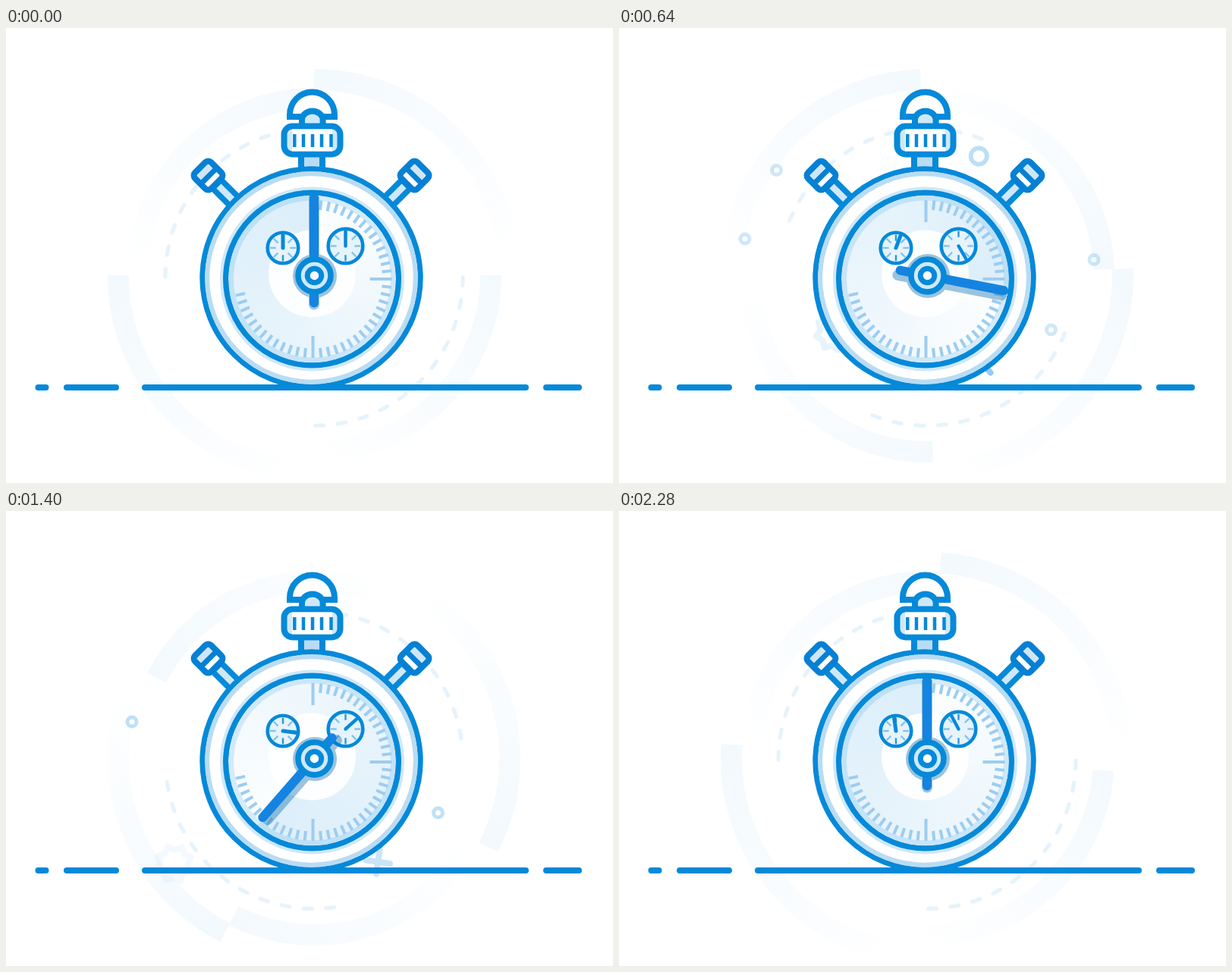
Animation, 800 px wide and 600 px high, one loop 2320 ms. Source, as an HTML page:

```html
<!DOCTYPE html>
<html lang="en">
<head>
<meta charset="utf-8">
<title>Stopwatch</title>
<style>
  html, body { margin: 0; width: 100%; height: 100%; overflow: hidden; background: #fff; }
  svg { display: block; width: 800px; height: 600px; }
  #sweep { width: 224px; height: 224px; border-radius: 50%; }
</style>
</head>
<body>
<svg viewBox="0 0 800 600" fill="none" stroke="#0589d9">
  <defs>
    <linearGradient id="fade" gradientUnits="userSpaceOnUse" x1="0" y1="-250" x2="250" y2="0">
      <stop offset="0" stop-color="#0589d9" stop-opacity=".05"/>
      <stop offset="1" stop-color="#0589d9" stop-opacity="0"/>
    </linearGradient>
    <clipPath id="face"><circle cx="403.5" cy="331" r="113"/></clipPath>
    <g id="button" stroke="#0680d4">
      <g transform="translate(266.5 194.5) rotate(-45)">
        <rect x="-8" y="16" width="16" height="42" fill="#cfe8f8" stroke="#0589d9" stroke-width="7.5"/>
        <rect x="-15" y="-15" width="30" height="30" rx="5.5" fill="#fff" stroke="none"/>
        <rect x="-15" y="-15" width="30" height="15" rx="5" fill="#cfe6f7" stroke="none"/>
        <path d="M-15 1H15" stroke-width="7"/>
        <rect x="-15" y="-15" width="30" height="30" rx="5.5" stroke-width="8"/>
      </g>
    </g>
  </defs>

  <g id="arcs" stroke="url(#fade)" stroke-width="28"></g>
  <g id="dashes" stroke-width="5" stroke-linecap="round" stroke-dasharray="11 18.5" opacity=".105"></g>
  <g id="bubbles" stroke-width="5"></g>
  <circle id="ring"/>
  <path id="gear" stroke-width="8" stroke-linejoin="round"/>
  <path id="plus" d="M-16 0H16M0 -16V16" stroke="#2f9be0" stroke-width="8" stroke-linecap="round"/>

  <use href="#button"/>
  <use href="#button" transform="translate(805 0) scale(-1 1)"/>

  <path d="M389 164V190H417V164" fill="#b9dcf4" stroke-width="8"/>
  <g id="crown" stroke-width="8">
    <path d="M374 117V114.5A29.5 30 0 0 1 433 114.5V117Z" fill="#fff"/>
    <path d="M390 128V121.5A13.8 12 0 0 1 417.6 121.5V128" fill="#cfe8f8"/>
    <rect x="366.5" y="129.5" width="74" height="37" rx="11" fill="#cfe8f8"/>
    <rect x="377" y="133.5" width="53" height="29" fill="#fff" stroke="none"/>
    <path d="M380.3 140V157M392 140V157M404 140V157M416 140V157M428.5 140V157" stroke-width="4.5"/>
  </g>

  <circle cx="402.5" cy="329.5" r="143.7" fill="#fff" stroke-width="7"/>
  <circle cx="402.5" cy="329.5" r="137.3" stroke="#b9dcf3" stroke-width="6"/>
  <circle cx="403.5" cy="331" r="119" stroke="#cfe8f8" stroke-width="5"/>
  <foreignObject x="291.5" y="219" width="224" height="224"><div id="sweep"></div></foreignObject>
  <circle cx="403.5" cy="331" r="107.5" stroke-width="8" opacity=".15"/>
  <circle cx="403.5" cy="324" r="57.5" fill="#fff" stroke="none" opacity=".92"/>
  <g id="ticks" transform="translate(404.5 331)" stroke="#9dcdf0" stroke-width="4"></g>
  <g id="dials"></g>
  <g clip-path="url(#face)">
    <g stroke="#0a6bab" opacity=".4" stroke-linecap="round">
      <path id="shade" d="M0 38V-101" stroke-width="14"/>
      <circle cx="407" cy="327" r="29" fill="#0a6bab" stroke="none"/>
    </g>
    <circle cx="403.5" cy="331" r="114" stroke-width="7"/>
    <path id="hand" d="M0 36V-103" stroke="#1484e0" stroke-width="12" stroke-linecap="round"/>
  </g>
  <circle cx="403.5" cy="331" r="114" stroke-width="7"/>
  <circle cx="406.5" cy="326.5" r="21.5" fill="#cfe9f9" stroke-width="7.5"/>
  <circle cx="406.5" cy="326.5" r="9.2" fill="#fff" stroke-width="7"/>

  <path d="M42.5 474H52.5M80 474H145M183 474H685M712 474H755" stroke-width="8" stroke-linecap="round"/>
</svg>
<script>
const LOOP = 2320, STEP = 40, TURN = 2280;
const $ = id => document.getElementById(id);

function add(parent, tag, attrs) {
  const el = document.createElementNS('http://www.w3.org/2000/svg', tag);
  for (const k in attrs) el.setAttribute(k, attrs[k]);
  parent.appendChild(el);
  return el;
}

// Fading quarter bands: radius, start angle, direction
for (const [r, a, dir] of [[258, 0, 1], [258, 270, -1], [233, 90, 1], [233, 0, -1]])
  add($('arcs'), 'path', { d: `M0 ${-r}A${r} ${r} 0 0 1 ${r} 0`, transform: `rotate(${a}) scale(${dir} 1)` });

for (const a of [0, 180])
  add($('dashes'), 'path', { d: 'M1.5 196A196 196 0 0 0 196 0', transform: `rotate(${a})` });

const bubbles = [[207.5, 187.5, 1000], [166, 278, 1560], [626, 305.5, 700], [569.5, 398, 2040]]
  .map(([cx, cy, end]) => ({ end, el: add($('bubbles'), 'circle', { cx, cy, r: 6 }) }));

let star = '';
for (let i = 0; i < 16; i++) {
  const r = i % 2 ? 18 : 24, a = i * Math.PI / 8;
  star += `${i ? 'L' : 'M'}${r * Math.sin(a)} ${-r * Math.cos(a)}`;
}
$('gear').setAttribute('d', star + 'Z');

for (let i = 0; i <= 43; i++)
  add($('ticks'), 'path', { d: `M0 -104V${i % 15 ? -91.5 : -75}`, transform: `rotate(${i * 6})` });

function makeDial(x, y, r, thick) {
  const g = add($('dials'), 'g', { transform: `translate(${x} ${y})` });
  add(g, 'circle', { r, fill: '#e6f3fb', 'stroke-width': 4.6 });
  for (let i = 0; i < 8; i++)
    add(g, 'path', {
      d: `M0 ${3 - r}V${11 - r}`, transform: `rotate(${i * 45})`,
      'stroke-width': 2.4, opacity: i % 4 ? .45 : .85
    });
  return add(g, 'path', { d: `M0 0V${3.5 - r}`, 'stroke-width': thick, 'stroke-linecap': 'round' });
}
const leftHand = makeDial(365, 290, 20.3, 5);
const rightHand = makeDial(447.5, 287.5, 22.8, 4.4);

const times = [0, 400, 840, 1120, 1400, 1760, 2280];
const leftKeys = [0, 3, 35, 76, 98, 205, 352];
const rightKeys = [0, 82, 206, 328, 408, 532, 692];

function lerpKeys(keys, t) {
  let i = 0;
  while (i < times.length - 2 && t > times[i + 1]) i++;
  return keys[i] + (keys[i + 1] - keys[i]) * (t - times[i]) / (times[i + 1] - times[i]);
}

const place = (el, x, y, a = 0) => el.setAttribute('transform', `translate(${x} ${y}) rotate(${a})`);
const fadeTo = (el, o) => el.setAttribute('opacity', Math.max(0, o));

function shadeOffset(a) {
  const bump = (from, to) => Math.sin(Math.PI * (a - from) / (to - from));
  if (a < 135) return 9.5 * bump(0, 135);
  return a > 180 ? -10 * bump(180, 360) : 0;
}

function draw(t) {
  const turn = 360 * t / TURN;
  place($('arcs'), 406, 326, .1291 * t + 1.34e-5 * t * t);
  place($('dashes'), 406, 328.5, turn * 2);

  place($('hand'), 406, 326.5, turn);
  const off = shadeOffset(turn);
  $('shade').setAttribute('transform', `translate(406 326.5) rotate(${turn}) translate(${off} 0)`);
  $('sweep').style.background =
    `conic-gradient(from ${turn}deg, rgba(5,137,217,.01), rgba(5,137,217,.085) 50%, rgba(5,137,217,.14))`;

  leftHand.setAttribute('transform', `rotate(${lerpKeys(leftKeys, t)})`);
  rightHand.setAttribute('transform', `rotate(${lerpKeys(rightKeys, t)})`);

  place($('crown'), 0, t < 360 ? 4 * Math.sin(Math.PI * t / 360) : 0);

  for (const b of bubbles) fadeTo(b.el, t < b.end ? Math.min(.25, t * .0003) : 0);

  place($('plus'), 470 + .0145 * t, 425 + .027 * t, 85 - .055 * t);
  fadeTo($('plus'), .72 - .00033 * t);

  const g = t - 840;
  place($('gear'), 267 - .081 * g, 418 + .084 * g, .05 * t);
  fadeTo($('gear'), Math.min(.09, (1640 - t) * .00019));

  const s = (t - 480) / 900, e = 1 - (1 - s) ** 2, ring = $('ring');
  const size = Math.max(0, Math.min(1, s * 4)) * (1.12 - .3 * s);
  place(ring, 438 + 112 * e, 195 - 80 * e);
  ring.setAttribute('r', 14 * size);
  ring.setAttribute('stroke-width', 7.5 * size);
  fadeTo(ring, s > 0 && s < 1 ? .33 * (1 - s) : 0);
}

function tick() {
  draw(Math.floor(performance.now() % LOOP / STEP) * STEP);
  requestAnimationFrame(tick);
}
tick();
</script>
</body>
</html>
```
